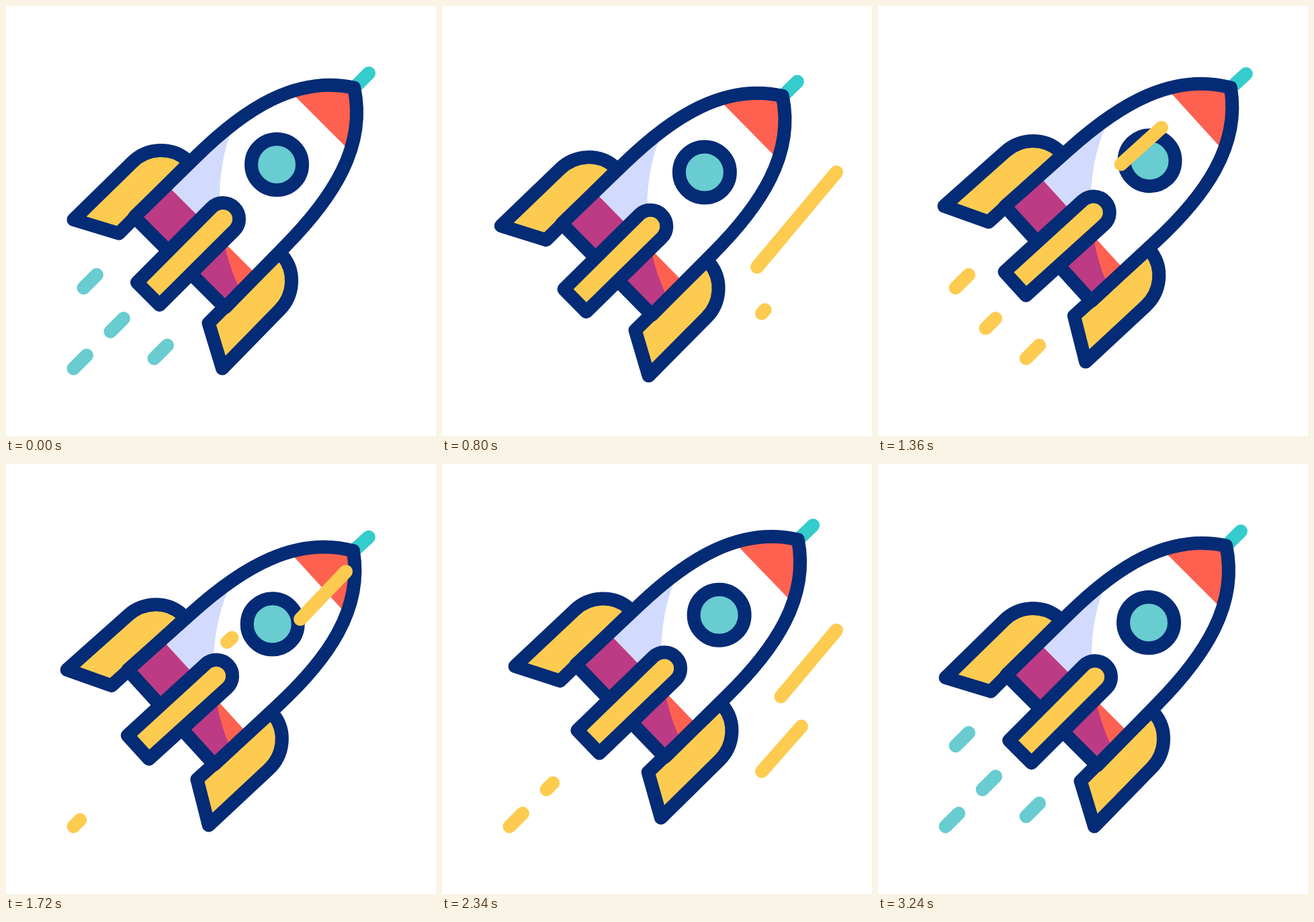
Write an HTML page with a canvas that moves like this. It is 640 by 640 pixels and loops after 3.52 s.

```html
<!DOCTYPE html>
<html lang="en">
<head>
<meta charset="utf-8">
<title>Rocket</title>
<style>
  html, body { margin: 0; width: 100%; height: 100%; overflow: hidden; background: #fff; }
  canvas { display: block; width: 640px; height: 640px; }
</style>
</head>
<body>
<canvas id="stage" width="640" height="640"></canvas>
<script>
const ctx = document.getElementById('stage').getContext('2d');
const LOOP = 3520, STEP = 20;
const NAVY = '#042b75', YELLOW = '#fdcb50', TEAL = '#68ccd1', MINT = '#34cccc',
      CORAL = '#ff6150', PURPLE = '#bc3b84', LILAC = '#d2dbfd';

const ramp = (t, from, time) => Math.min(1, Math.max(0, (t - from) / time));
const ease = k => (1 - Math.cos(Math.PI * k)) / 2;

const body = new Path2D('M191 314 L283 224 C355 153 432 103 518 121.5 ' +
  'C537 208 487 285 416 357 L326 449 Z');
const fin = new Path2D('M100.5 318 L168 338.5 L272 234 L268 228 ' +
  'C245 209 210 211 188 232.5 Z');
const bar = new Path2D('M195 411.5 L306 300 A24 24 0 0 1 340 334 L228.5 445 Z');
const porthole = new Path2D('M441 236 A38 38 0 1 1 365 236 A38 38 0 1 1 441 236 Z');
const nose = new Path2D('M396 100 L560 264 L600 60 Z');
const band = new Path2D('M201 228 L401 428 L330 500 L130 300 Z');
const shade = new Path2D('M335 188 C311 250 310 340 346 417 L330 500 L100 330 L300 130 Z');

// The rocket swings along its flight axis and tilts in the middle of each swing.
const AMP = 12.5, TILT = 2.95, HALF = 119.2;
const LIFT = 310, FIRST = 455, LAST = FIRST + 19 * HALF, PEAK = 2820, REST = 3020;

const arc = k => TILT * Math.abs(Math.sin(Math.PI * k)) ** 1.7;

function pose(t) {
  if (t < FIRST) {
    const k = ramp(t, LIFT, FIRST - LIFT);
    return [AMP * ease(k), arc(k)];
  }
  if (t > PEAK) return [AMP * (1 - ease(ramp(t, PEAK, REST - PEAK))), 0];
  const k = t < LAST ? (t - FIRST) / HALF + 1 : ramp(t, LAST, PEAK - LAST);
  return [AMP * (2 * ease(k) - 1), arc(k)];
}

function paint(path, color) {
  ctx.fillStyle = color;
  ctx.fill(path);
}

function outline(path) {
  ctx.strokeStyle = NAVY;
  ctx.stroke(path);
}

function shape(path, fill) {
  paint(path, fill);
  outline(path);
}

function line(x1, y1, x2, y2, color) {
  ctx.strokeStyle = color;
  ctx.beginPath();
  ctx.moveTo(x1, y1);
  ctx.lineTo(x2, y2);
  ctx.stroke();
}

function rocket(t) {
  const [shift, tilt] = pose(t);
  const sag = 0.76 * tilt;
  ctx.save();
  ctx.translate(403 + shift - sag, 236 - shift - sag);
  ctx.rotate(tilt * Math.PI / 180);
  ctx.translate(-403, -236);

  line(540, 100, 518, 122, MINT);
  shape(fin, YELLOW);
  ctx.save();
  ctx.transform(0, -1, -1, 0, 640, 640); // mirror across the flight axis
  shape(fin, YELLOW);
  ctx.restore();

  paint(body, '#fff');
  ctx.save();
  ctx.clip(body);
  paint(nose, CORAL);
  paint(shade, LILAC);
  paint(band, CORAL);
  ctx.clip(band);
  paint(shade, PURPLE);
  ctx.restore();
  outline(body);

  shape(bar, YELLOW);
  shape(porthole, TEAL);
  ctx.restore();
}

// A streak grows away from (x, y), lives a while, then is wiped the same way.
const DRAW = 140;

function streak(t, x, y, dx, dy, born, life, color = YELLOW) {
  const head = ramp(t, born, DRAW), tail = ramp(t, born + life, DRAW);
  if (head > tail) line(x + dx * tail, y + dy * tail, x + dx * head, y + dy * head, color);
}

function dash(t, x, y, delay) {
  const pass = (born, life, color) => streak(t, x, y, -19.5, 19.5, born, life, color);
  pass(-LOOP, LOOP + 300 + delay / 3, TEAL);
  for (let i = 0; i < 2; i++) pass(1180 + 775 * i + delay, 240);
  pass(2410 + delay, LOOP, TEAL);
}

function exhaust(t) {
  dash(t, 135, 400, 0);
  dash(t, 240, 505, 0);
  dash(t, 175, 465, 75);
  dash(t, 120, 520, 230);
}

function wind(t) {
  for (let i = 0; i < 2; i++) {
    const turn = 1670 * i;
    streak(t, 587, 247.5, -118, 141, 572 + turn, 230);
    streak(t, 535, 390.5, -59, 67, 460 + turn, 211);
  }
  streak(t, 422, 181, -93, 84, 1269, 322);
  streak(t, 506, 160, -68, 71, 1400, 325);
  streak(t, 399, 165, -83, 74, 2646, 325);
  streak(t, 494, 133, -66, 70, 2684, 410);
}

function draw(now) {
  const t = Math.floor((now % LOOP) / STEP) * STEP;
  ctx.fillStyle = '#fff';
  ctx.fillRect(0, 0, 640, 640);
  ctx.lineWidth = 20;
  ctx.lineCap = ctx.lineJoin = 'round';
  exhaust(t);
  rocket(t);
  wind(t);
}

const begin = performance.now();
function tick() {
  draw(performance.now() - begin);
  requestAnimationFrame(tick);
}
tick();
</script>
</body>
</html>
```
